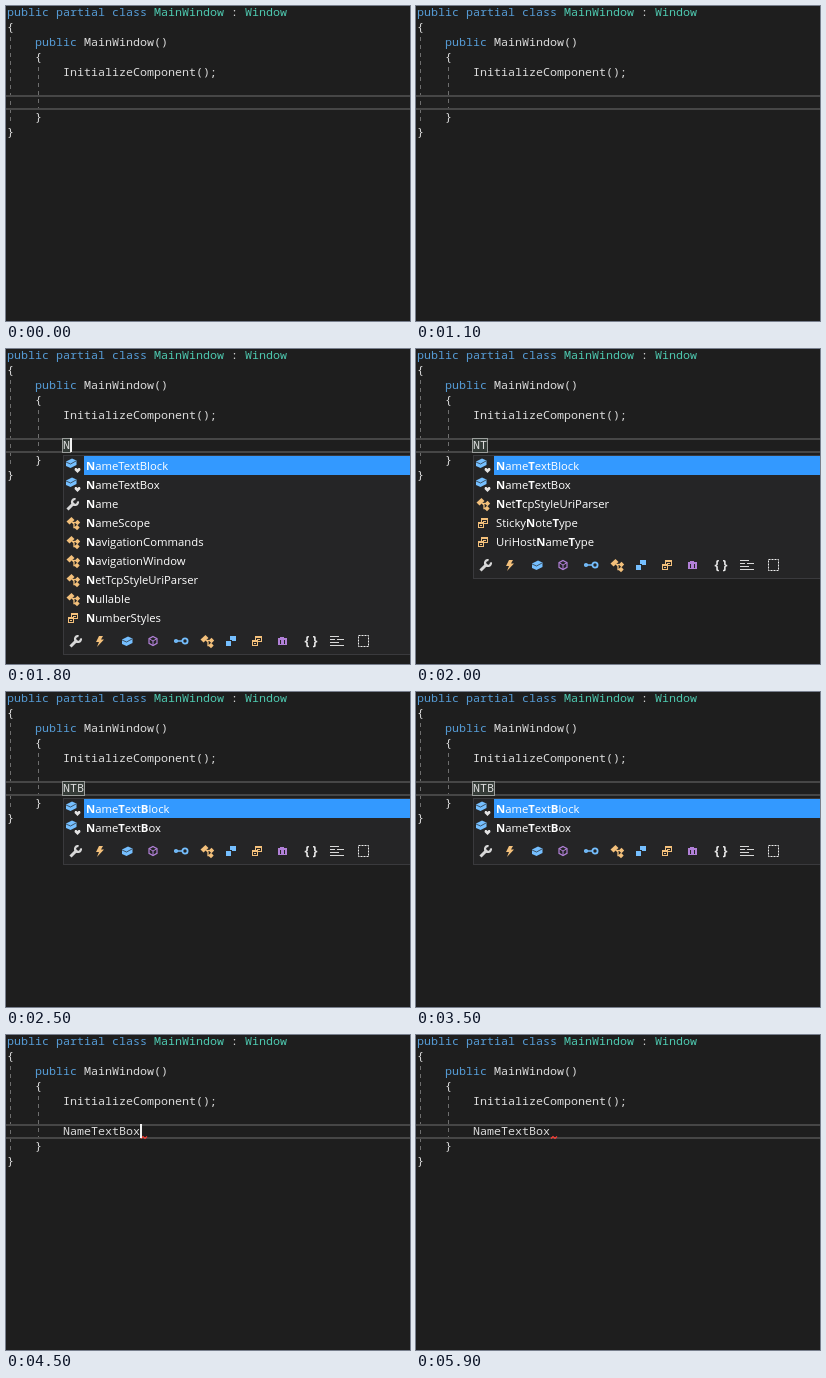
Write an HTML page with a canvas that moves like this. It is 404 px wide and 315 px high and loops after 6000 ms.

```html
<!DOCTYPE html>
<html lang="en">
<head>
<meta charset="utf-8">
<title>Code completion</title>
<style>
  html, body { margin: 0; width: 100%; height: 100%; overflow: hidden; background: #1e1e1e; }
  canvas { display: block; }
</style>
</head>
<body>
<canvas id="stage" width="404" height="315"></canvas>
<script>
const ctx = document.getElementById('stage').getContext('2d');
const LOOP = 6000, CHAR = 7, LINE = 15, ROW = 19, LIST_TOP = 107;
const PLAIN = '#dcdcdc', KEYWORD = '#569cd6', TYPE = '#4ec9b0';
const BLUE = '#75bfff', ORANGE = '#f3c07b', PURPLE = '#b180d7', GREY = '#d8d8d8', PANEL = '#252526';

// Pick the size that gives the monospaced font its 7px advance.
const CODE_FAMILY = '"Noto Sans Mono", "DejaVu Sans Mono", monospace';
ctx.font = `100px ${CODE_FAMILY}`;
const CODE_FONT = `${CHAR * 100 / ctx.measureText('M').width}px ${CODE_FAMILY}`;
const UI_FONT = '11.3px "Open Sans", "Noto Sans", sans-serif';

const SOURCE = [
  [0, 0, ['public partial class ', KEYWORD], ['MainWindow', TYPE], [' : ', PLAIN], ['Window', TYPE]],
  [1, 0, ['{', PLAIN]],
  [2, 4, ['public ', KEYWORD], ['MainWindow()', PLAIN]],
  [3, 4, ['{', PLAIN]],
  [4, 8, ['InitializeComponent();', PLAIN]],
  [7, 4, ['}', PLAIN]],
  [8, 0, ['}', PLAIN]]
];

const BOXES = [['field', 'NameTextBlock'], ['field', 'NameTextBox']];
const LISTS = {
  N: [...BOXES, ['wrench', 'Name'], ['klass', 'NameScope'], ['klass', 'NavigationCommands'],
    ['klass', 'NavigationWindow'], ['klass', 'NetTcpStyleUriParser'], ['klass', 'Nullable'],
    ['enumeration', 'NumberStyles']],
  NT: [...BOXES, ['klass', 'NetTcpStyleUriParser'], ['enumeration', 'StickyNoteType'],
    ['enumeration', 'UriHostNameType']],
  NTB: BOXES
};

// Each value holds from its time until the next entry.
const TYPED = [[0, ''], [1500, 'N'], [2000, 'NT'], [2200, 'NTB'], [4500, 'NameTextBox']];
const QUERY = [[0, ''], [1800, 'N'], [2000, 'NT'], [2300, 'NTB'], [4500, '']];
const CARET = [[0, 0], [600, 1], [1100, 0], [1500, 1], [2000, 0], [2200, 1], [2500, 0], [3000, 1],
  [3500, 0], [3700, 1], [4000, 0], [4500, 1], [4900, 0], [5400, 1], [5900, 0]];
const valueAt = (track, t) => track.filter(([start]) => start <= t).pop()[1];

function rect(x, y, w, h, color) {
  ctx.fillStyle = color;
  ctx.fillRect(x, y, w, h);
}

function path(points, { fill, stroke, width = 1, close = true }) {
  ctx.beginPath();
  points.forEach(([x, y]) => ctx.lineTo(x, y));
  if (close) ctx.closePath();
  if (fill) { ctx.fillStyle = fill; ctx.fill(); }
  if (stroke) { ctx.strokeStyle = stroke; ctx.lineWidth = width; ctx.stroke(); }
}

function frame(x, y, w, h, color) {
  rect(x, y, w, h, color);
  rect(x + 1, y + 2, w - 2, h - 3, PANEL);
}

function arc(x, y, r, color, width, from = 0, to = 2 * Math.PI) {
  ctx.beginPath();
  ctx.arc(x, y, r, from, to);
  ctx.strokeStyle = color;
  ctx.lineWidth = width;
  ctx.stroke();
}

const diamond = (x, y, r, color) =>
  path([[x, y - r], [x + r, y], [x, y + r], [x - r, y]], { fill: color });

// Icons are drawn around their centre.
const icons = {
  wrench() {
    path([[-5.5, 5.5], [1, -1]], { stroke: GREY, width: 3, close: false });
    arc(2, -2, 3, GREY, 2.2, -.2, 4.9);
  },
  lightning() {
    path([[-1, -5], [3, -5], [1, -1.5], [4, -1.5], [-3, 6], [-1, 1], [-4, 1]], { fill: ORANGE });
  },
  field() {
    path([[-5, -1.5], [1, -4.5], [5.5, -2.5], [5.5, 2], [-.5, 5], [-5, 3]], { fill: BLUE });
    path([[-5, -1], [-.5, 1], [5, -2]], { stroke: PANEL, width: .7, close: false });
  },
  cube() {
    path([[0, -4.5], [4, -2.3], [4, 2.3], [0, 4.5], [-4, 2.3], [-4, -2.3]], { stroke: PURPLE, width: 1.2 });
    path([[-4, -2.3], [0, 0], [4, -2.3]], { stroke: PURPLE, close: false });
    path([[0, 0], [0, 4.5]], { stroke: PURPLE, close: false });
  },
  connector() {
    arc(4, 0, 2.6, BLUE, 1.8);
    rect(-4, -.75, 5, 1.5, BLUE);
    arc(-5, 0, 1.2, BLUE, 1.8);
  },
  klass() {
    path([[-1, -1], [1, 1], [1, 4.5], [4, 4.5]], { stroke: ORANGE, width: 1.3, close: false });
    path([[-6.5, -1.5], [-1.5, -6], [1.5, -3], [-3.5, 1.5]], { fill: ORANGE });
    path([[0, -.5], [4, -.5]], { stroke: ORANGE, width: 1.3, close: false });
    diamond(4.5, -.5, 2.7, ORANGE);
    diamond(4, 4.5, 2.7, ORANGE);
  },
  struct() {
    rect(-1, -5, 6, 5, BLUE);
    rect(-6, -1, 7, 6, PANEL);
    rect(-5, 0, 5, 5, BLUE);
  },
  enumeration() {
    frame(-2, -5, 7, 6, ORANGE);
    rect(0, -2, 3, 1, ORANGE);
    frame(-5, -1, 6, 6, ORANGE);
    rect(-3, 2, 2, 1, ORANGE);
  },
  bag() {
    frame(-2, -4, 4, 4, PURPLE);
    rect(-4, -3, 9, 7, PURPLE);
    rect(-2, -1, 1, 4, PANEL);
    rect(2, -1, 1, 4, PANEL);
  },
  braces() {
    ctx.font = 'bold 12.5px "Open Sans", sans-serif';
    ctx.fillStyle = '#e8e8e8';
    ctx.textAlign = 'center';
    ctx.fillText('{ }', 0, 4);
  },
  snippet() {
    rect(-7, -5, 9, 1, GREY);
    rect(-7, -2, 5, 1, GREY);
    rect(0, -2, 7, 1, GREY);
    rect(-7, 1, 9, 1, GREY);
    rect(-7, 4, 14, 1, GREY);
  },
  selection() {
    ctx.setLineDash([2, 1]);
    path([[-5.5, -5.5], [4.5, -5.5], [4.5, 5.5], [-5.5, 5.5]], { stroke: '#f0f0f0' });
    ctx.setLineDash([]);
  },
  heart() {
    path([[0, 3], [-3, 0], [-2.5, -2], [-1, -2], [0, -1], [1, -2], [2.5, -2], [3, 0]], { fill: '#e4e4e4' });
  }
};

const TOOLBAR = [['wrench', 70], ['lightning', 94], ['field', 121], ['cube', 147], ['connector', 175],
  ['klass', 201], ['struct', 225], ['enumeration', 251], ['bag', 276], ['braces', 305],
  ['snippet', 331], ['selection', 358]];

function icon(name, x, y) {
  ctx.save();
  ctx.translate(x, y);
  icons[name]();
  ctx.restore();
}

function code(line, column, parts) {
  ctx.font = CODE_FONT;
  for (const [text, color] of parts) {
    ctx.fillStyle = color;
    ctx.fillText(text, 1 + column * CHAR, 10 + line * LINE);
    column += text.length;
  }
}

function guide(x, top, bottom) {
  ctx.setLineDash([4, 4]);
  path([[x, top], [x, bottom]], { stroke: '#6e6e6e', close: false });
  ctx.setLineDash([]);
}

function squiggle(left, right) {
  const points = [];
  for (let x = left, up = false; x <= right; x += 2, up = !up) points.push([x, up ? 101.5 : 103.5]);
  path(points, { stroke: '#fc3e36', width: 1.2, close: false });
}

// Letters of the query are bold where they match in order.
function matchedText(label, query, x, y) {
  let next = 0;
  ctx.fillStyle = '#ffffff';
  for (const run of label.split(/(?=[A-Z])/)) {
    const bold = run[0] === query[next];
    if (bold) next++;
    const pieces = bold ? [['bold ', run[0]], ['', run.slice(1)]] : [['', run]];
    for (const [weight, text] of pieces) {
      ctx.font = weight + UI_FONT;
      ctx.fillText(text, x, y);
      x += ctx.measureText(text).width;
    }
  }
}

function popup(query, selected) {
  const items = LISTS[query];
  const listEnd = LIST_TOP + items.length * ROW;
  rect(57, 106, 347, listEnd - 78, '#3a3a3d');
  rect(58, 107, 346, listEnd - 80, PANEL);
  items.forEach(([kind, label], i) => {
    const top = LIST_TOP + i * ROW;
    if (i === selected) rect(78, top, 326, ROW, '#3399ff');
    if (kind === 'field') {
      icon('field', 65, top + 7);
      icon('heart', 71.5, top + 14);
    } else {
      icon(kind, 67, top + 10);
    }
    matchedText(label, query, 80, top + 14);
  });
  TOOLBAR.forEach(([name, x]) => icon(name, x, listEnd + 14));
}

function draw(t) {
  const typed = valueAt(TYPED, t), query = valueAt(QUERY, t);
  const end = 57 + typed.length * CHAR;
  rect(0, 0, 404, 315, '#1e1e1e');
  guide(4.5, 31, 118);
  guide(32.5, 61, 104);
  rect(0, 89, 404, 2, '#464646');
  rect(0, 102, 404, 2, '#464646');
  SOURCE.forEach(([line, column, ...parts]) => code(line, column, parts));

  if (t >= 1600 && t < 4500) {
    rect(56, 89, end - 55, 15, '#343b37');
    ctx.strokeStyle = '#9a9d9b';
    ctx.lineWidth = 1;
    ctx.strokeRect(56.5, 89.5, end - 56, 14);
  }
  code(6, 8, [[typed, PLAIN]]);
  if (t >= 4500) squiggle(end + 1, end + 8);
  else if (t >= 4000) squiggle(58, end + 8);
  if (valueAt(CARET, t)) rect(end, 89, 2, 14, '#f0f0f0');
  if (query) popup(query, t >= 3700 ? 1 : 0);
}

function tick() {
  draw(performance.now() % LOOP);
  requestAnimationFrame(tick);
}
tick();
</script>
</body>
</html>
```
